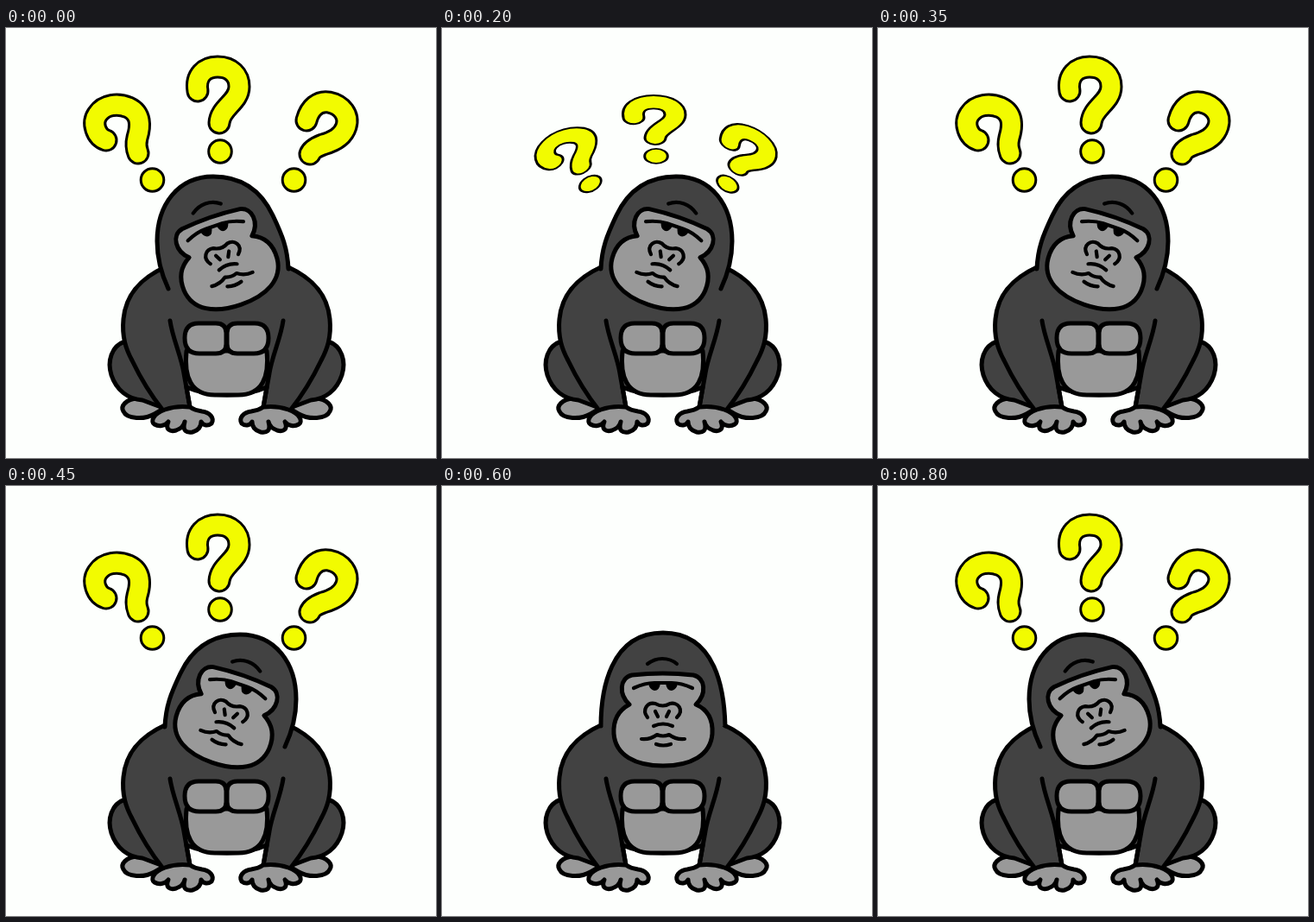
Write an HTML page that moves like this. It is 498x498 px and loops after 850 ms.

```html
<!DOCTYPE html>
<html lang="en">
<head>
<meta charset="utf-8">
<title>Puzzled gorilla</title>
<style>
html, body { margin: 0; width: 100%; height: 100%; overflow: hidden; background: #fdfffd; }
svg { display: block; width: 100vw; height: 100vh; }
.line { fill: none; stroke: #000; stroke-width: 5; stroke-linecap: round; stroke-linejoin: round; }
.dark { fill: #424242; }
.grey { fill: #999; }
.thin { stroke-width: 4.2; }
.solid { fill: #000; }
.rim, .core { fill: none; stroke-linecap: round; stroke-linejoin: round; }
.rim { stroke: #000; stroke-width: 27; }
.core { stroke: #f2fb00; stroke-width: 21; }
.dot { fill: #f2fb00; stroke: #000; stroke-width: 3; }
</style>
</head>
<body>
<svg viewBox="0 0 498 498">
  <defs>
    <g id="leg">
      <path class="line grey" d="M152 429C139 430 132 438 136 444C140 453 160 454 172 447L184 440L160 424Z"/>
      <path class="line dark" d="M138 363C122 368 117 386 122 402C128 420 142 430 158 431L182 440L152 372Z"/>
    </g>
    <g id="front">
      <path class="line grey" d="M223 342H243Q255 342 255 353V366Q255 377 243 377H224Q207 377 207 359Q207 342 223 342Z"/>
      <path class="line" d="M190 339C193 360 203 380 206 400L213 439"/>
      <path class="line grey" d="M184 442C170 447 167 456 172 459C177 462 184 461 188 456C184 465 190 468 197 466C203 464 206 460 207 456C204 467 209 469 216 468C223 466 226 462 226 456C229 461 234 461 238 458C242 452 236 445 227 444C220 443 216 441 213 439Q198 437 184 442Z"/>
    </g>
    <g id="face">
      <path class="line grey" d="M220 219Q256 215 291 219C305 222 307 241 294 253C308 259 314 271 313 287C311 312 288 324 256 324C224 324 201 312 199 287C198 271 204 260 217 253C204 241 206 222 220 219Z"/>
      <path class="line thin" d="M238 206Q246 200 255 200Q265 200 272 206M222 234Q235 228 246 228H266Q277 228 290 234"/>
      <path class="solid" d="M239 228H253Q252 237 246 237Q240 236 239 228ZM259 228H273Q272 236 266 237Q260 237 259 228Z"/>
      <path class="line thin" d="M238 268C231 259 238 250 247 252Q256 257 264 252C273 250 281 259 272 268M247 261L250 267M263 261L260 267M245 278Q256 273 267 278M231 293Q241 294 249 288Q256 291 263 288Q271 294 281 293M248 299Q256 302 265 299"/>
    </g>
  </defs>

  <use href="#leg"/>
  <use href="#leg" transform="matrix(-1 0 0 1 511 0)"/>
  <path class="line dark" d="M184 277C160 288 139 305 136 337C134 358 139 372 146 385C157 408 170 428 182 443L213 439L209 416Q230 425 256 425Q282 425 302 416L298 439L329 443C341 428 354 408 365 385C372 372 377 358 375 337C372 305 351 288 327 277"/>
  <path class="line grey" d="M209 374C206 404 214 425 242 425H269C297 425 305 404 302 374Z"/>
  <use href="#front"/>
  <use href="#front" transform="matrix(-1 0 0 1 511 0)"/>

  <g id="level">
    <path class="line dark" d="M184 278C184 238 194 170 256 170C318 170 327 238 328 278"/>
    <use href="#face"/>
  </g>
  <g id="tilt">
    <path class="line dark" d="M188 302C180 285 175 268 175 247C175 205 199 172 240 172C282 172 300 198 309 217C320 240 326 255 327 279"/>
    <use href="#face" transform="translate(262 291) rotate(-19) translate(-256 -293)"/>
  </g>
  <g id="marks"></g>
</svg>
<script>
const LOOP = 850;
const $ = id => document.getElementById(id);

// curve, dot centre, squash base, lean in degrees
const MARKS = [
  ["M116 130C104 126 99 110 106 100C114 88 130 87 142 92C157 99 156 114 152 127C150 135 151 140 153 145", 169.5, 176, 167, 193, -27],
  ["M222 73C219 55 230 45 245 45C261 45 270 55 270 68C270 86 248 92 247 110", 248, 143, 240, 158, 0],
  ["M348 107C352 92 362 84 374 86C389 89 398 101 394 114C390 127 378 132 367 135C359 138 354 141 352 146", 333.5, 176, 326, 189, 30]
];

// start in ms, head (-1 left, 0 level, 1 right), mark width, mark height
const STEPS = [
  [0, -1, 1, 1],
  [100, 0, 0, 0],
  [150, 1, .9, .35],
  [200, 1, 1, .64],
  [250, 1, .76, .95],
  [300, 1, .9, 1.06],
  [350, 1, 1, 1],
  [600, 0, 0, 0],
  [650, -1, .9, .35],
  [700, -1, 1, .64],
  [750, -1, .88, 1.06],
  [800, -1, 1, 1]
];

$("marks").innerHTML = MARKS.map(([d, x, y]) =>
  `<g><path class="rim" d="${d}"/><path class="core" d="${d}"/><circle class="dot" cx="${x}" cy="${y}" r="13.3"/></g>`
).join("");
const marks = [...$("marks").children];

const show = (el, on) => { el.style.display = on ? "" : "none"; };

function draw(time) {
  const t = time % LOOP;
  const [, head, w, h] = STEPS.findLast(step => step[0] <= t);
  show($("level"), !head);
  show($("tilt"), head);
  show($("marks"), head);
  $("tilt").setAttribute("transform", head > 0 ? "matrix(-1 0 0 1 511 0)" : "");
  marks.forEach((mark, i) => {
    const [, , , bx, by, lean] = MARKS[i];
    mark.setAttribute("transform",
      `translate(${bx} ${by}) rotate(${lean}) scale(${w} ${h}) rotate(${-lean}) translate(${-bx} ${-by})`);
  });
}

const start = performance.now();
function tick() {
  draw(performance.now() - start);
  requestAnimationFrame(tick);
}
tick();
</script>
</body>
</html>
```
